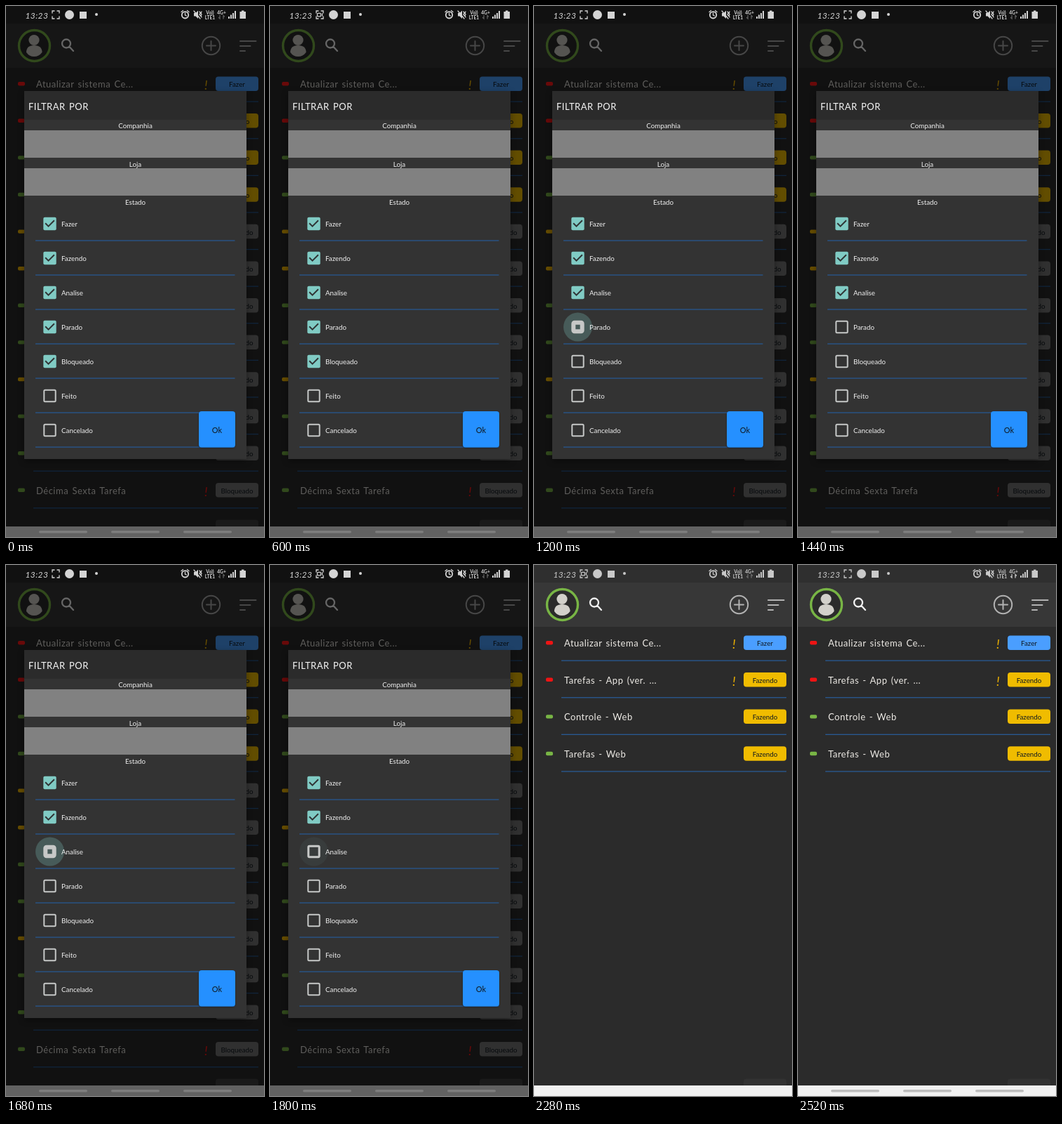
Write an HTML page that moves like this. It is 368 by 756 pixels and loops after 2.88 s.

```html
<!DOCTYPE html>
<html lang="pt">
<head>
<meta charset="utf-8">
<title>Filtrar tarefas</title>
<style>
  html, body { margin: 0; width: 100%; height: 100%; overflow: hidden; background: #2b2b2b; }
  svg {
    display: block; width: 368px; height: 756px; font: 9.8px Lato, sans-serif;
    --bar: #2f2f2f; --head: #373737; --page: #2b2b2b; --status: #c9c9c9;
    --ring: #78b545; --person: #d2d0ca; --find: #f0f0f0; --icon: #b2b2b2;
    --title: #eeebe6; --line: #285a94; --label: #101820;
    --red: #ee1414; --green: #78b545; --amber: #f0b400;
    --blue: #4a9eff; --yellow: #f0bc00; --grey: #343434; --late: #323232;
    --nav: #f1f1f1; --grip: #bdbdbd;
  }
  svg.dim {
    --bar: #111; --head: #161616; --page: #111; --status: #d4d4d4;
    --ring: #31491c; --person: #555451; --find: #666; --icon: #474747;
    --title: #5f5e5c; --line: #10243b; --label: #070a0d;
    --red: #680909; --green: #31491c; --amber: #664d00;
    --blue: #1e4168; --yellow: #624d00; --grey: #303030; --late: #1a1a1a;
    --nav: #626262; --grip: #7d7d7d;
  }
  .big { font-size: 13px; letter-spacing: .5px; word-spacing: 1.5px; }
  .mid { text-anchor: middle; }
  .clock { font-size: 12px; font-style: italic; letter-spacing: .4px; }
  .net { font-size: 6.6px; font-weight: 700; }
  .bang { font-size: 18px; font-style: italic; }
  .stroke { fill: none; stroke-linecap: round; }
  #dialog { filter: drop-shadow(0 3px 5px rgba(0, 0, 0, .35)); }
  #ok { filter: drop-shadow(0 1px 1px rgba(0, 0, 0, .4)); }
</style>
</head>
<body>
<svg id="stage" class="dim" viewBox="0 0 368 756">
  <rect width="368" height="756" fill="var(--page)"/>
  <rect y="25" width="368" height="63" fill="var(--head)"/>
  <rect width="368" height="25" fill="var(--bar)"/>

  <circle cx="40.5" cy="56.5" r="22" fill="var(--page)" stroke="var(--ring)" stroke-width="3.4"/>
  <g fill="var(--person)">
    <circle cx="40" cy="48.5" r="7.6"/>
    <path d="M29 66Q29 56 40 56Q51.500 56 51.500 66Q47 72 40 72Q33 72 29 66Z"/>
  </g>
  <path class="stroke" stroke="var(--find)" stroke-width="2.3" d="M92 53.500a6 6 0 1 0-12 0a6 6 0 1 0 12 0M90.500 58L96 64"/>
  <g class="stroke" stroke="var(--icon)" stroke-width="2">
    <circle cx="292.500" cy="56.500" r="12.700"/>
    <path d="M286 56.500h13M292.500 50v13M334 50h22.500M334 57h14.500M334 64h7"/>
  </g>

  <g id="list"></g>

  <g fill="var(--status)">
    <text class="clock" x="27.500" y="17.500">13:23</text>
    <circle cx="90.500" cy="12.500" r="6.500"/>
    <rect x="105" y="8" width="10" height="10"/>
    <circle cx="129" cy="12" r="2"/>
    <text class="net mid" x="291" y="11.500">Vo))</text>
    <text class="net mid" x="291" y="18.500">LTE1</text>
    <text class="net mid" x="307.500" y="11.500">4G+</text>
    <path d="M317 15h2v3h-2zM320 12.500h2v5.500h-2zM323 10h2v8h-2zM326 7h2v11h-2z"/>
    <path d="M333.500 8h2.500v-1.500h3.500v1.500h2.500v10h-8.500z"/>
    <path d="M268 10h2.500l3.500-3.500v11.500l-3.500-3.500h-2.500z"/>
  </g>
  <g class="stroke" stroke="var(--status)" stroke-width="1.300">
    <path d="M66 10v-3h3M73 7h3v3M76 15v3h-3M69 18h-3v-3"/>
    <g id="camera"><rect x="67.500" y="10.300" width="5" height="4.600" rx="1"/><path d="M74.500 11v3"/></g>
    <path id="arrows" d="M305 13.500v4.500l-1.500-1.500M310 18v-4.500l1.500 1.500"/>
    <circle cx="255.500" cy="12.800" r="4.700" stroke-width="1.800"/>
    <path d="M255.500 10v3l2 1M250 8.500l2.500-2M261 8.500l-2.500-2M268 7l9 11M276 8l1.500 2-1.500 2 1.500 2M279 8l-1 2 1 2-1 2 1 2"/>
  </g>

  <rect y="741" width="368" height="15" fill="var(--nav)"/>
  <g id="grips" fill="var(--grip)">
    <rect x="47" y="747" width="69" height="3.600" rx="1.800"/>
    <rect x="150" y="747" width="69" height="3.600" rx="1.800"/>
    <rect x="253" y="747" width="69" height="3.600" rx="1.800"/>
  </g>

  <g id="dialog">
    <rect x="26" y="121" width="317" height="524" fill="#333"/>
    <rect x="26" y="121" width="317" height="41" fill="#2b2b2b"/>
    <path d="M26 177h317v39H26zM26 231h317v39H26z" fill="#818181"/>
    <text class="big" x="32" y="148" fill="#f5f5f5">FILTRAR POR</text>
    <g class="mid" fill="#f0f0f0">
      <text x="184.500" y="174">Companhia</text>
      <text x="184.500" y="228.500">Loja</text>
      <text x="184.500" y="282.500">Estado</text>
    </g>
    <g id="states"></g>
    <rect id="ok" x="275" y="577" width="52" height="51.500" rx="4" fill="#2590ff"/>
    <text class="mid" x="301" y="607.500" font-size="11" fill="#101820">Ok</text>
  </g>
</svg>
<script>
const LOOP = 2880, STEP = 120, CLOSE = 19;
const $ = id => document.getElementById(id);

function set(el, attrs) {
  for (const key in attrs) el.setAttribute(key, attrs[key]);
  return el;
}
function add(parent, tag, attrs, text = '') {
  const el = set(document.createElementNS('http://www.w3.org/2000/svg', tag), attrs);
  el.textContent = text;
  return parent.appendChild(el);
}
const show = (el, on) => el.setAttribute('display', on ? 'inline' : 'none');

// mark colour, title, badge, badge colour, priority colour
const tasks = [
  ['red', 'Atualizar sistema Ce...', 'Fazer', 'blue', 'amber'],
  ['red', 'Tarefas - App (ver. ...', 'Fazendo', 'yellow', 'amber'],
  ['green', 'Controle - Web', 'Fazendo', 'yellow'],
  ['green', 'Tarefas - Web', 'Fazendo', 'yellow'],
  ...['amber', 'amber', 'green', 'green', 'amber', 'green', 'green']
    .map(mark => [mark, '', 'Bloqueado', 'grey']),
  ['green', 'Décima Sexta Tarefa', 'Bloqueado', 'grey', 'red'],
  ['red', 'Dual', 'Bloqueado', 'late', 'red']
];

const rows = tasks.map(([mark, title, badge, color, bang], i) => {
  const y = 110.7 + 52.6 * i;
  const tag = add($('list'), 'rect', { x: 299, y: y - 10.3, width: 61, height: 20.5, rx: 4, fill: `var(--${color})` });
  const info = add($('list'), 'g');
  add(info, 'rect', { x: 17, y: y - 2.7, width: 10, height: 5.4, rx: 2, fill: `var(--${mark})` });
  add(info, 'text', { class: 'big', x: 43, y: y + 5.5, fill: 'var(--title)' }, title);
  if (bang) add(info, 'text', { class: 'bang', x: 283, y: y + 8.5, fill: `var(--${bang})` }, '!');
  add(info, 'text', { class: 'mid', x: 329.5, y: y + 4.5, fill: 'var(--label)' }, badge);
  add(info, 'rect', { x: 39, y: y + 24.8, width: 321, height: 1.3, fill: 'var(--line)' });
  return { info, tag };
});

// label, step of the tap that clears it (-9: clear from the start)
const options = [
  ['Fazer', 99], ['Fazendo', 99], ['Analise', 13], ['Parado', 9],
  ['Bloqueado', 6], ['Feito', -9], ['Cancelado', -9]
];

const boxes = options.map(([label, tap], i) => {
  const y = 310 + 49 * i, g = $('states');
  const ripple = add(g, 'circle', { cx: 62.5, cy: y, fill: '#80cbc4' });
  const on = add(g, 'g');
  add(on, 'rect', { x: 53.3, y: y - 9.2, width: 18.4, height: 18.4, rx: 2, fill: '#80cbc4' });
  add(on, 'path', { d: `M56.100 ${y - .7}l4.400 4.400 8.400-8.400`, fill: 'none', stroke: '#303536', 'stroke-width': 2 });
  const off = add(g, 'rect', { rx: 1.5, fill: 'none', stroke: '#c6c8c7' });
  add(g, 'text', { x: 79, y: y + 4.3, fill: '#f0f0f0' }, label);
  add(g, 'rect', { x: 42, y: y + 23, width: 284.5, height: 2, fill: '#2b4a6f' });
  return { y, tap, ripple, on, off };
});

// ripple radius, ripple opacity, outline width
const phases = [[13, .12, 2], [20.5, .26, 6], [20.5, .06, 3], [0, 0, 2]];

function drawBox({ y, tap, ripple, on, off }, step) {
  const age = step - tap;
  const [r, opacity, edge] = phases[age < 0 ? 3 : Math.min(age, 3)];
  const size = 18.4 - edge;
  set(ripple, { r, opacity });
  set(off, { x: 62.5 - size / 2, y: y - size / 2, width: size, height: size, 'stroke-width': edge });
  show(on, age < 1);
  show(off, age >= 1);
}

function draw(step) {
  const open = step < CLOSE;
  $('stage').classList.toggle('dim', open);
  show($('dialog'), open);
  rows.forEach(({ info, tag }, i) => {
    const last = i === 12;
    show(info, i < 4 || open && (!last || step >= 18));
    show(tag, i < 4 || open || last);
  });
  boxes.forEach(box => drawBox(box, step));
  show($('camera'), Math.floor(step / 5) % 2);
  $('arrows').setAttribute('opacity', step <= CLOSE ? .4 : 1);
  show($('grips'), step !== CLOSE);
}

let shown = -1;
function tick() {
  const step = Math.floor(performance.now() % LOOP / STEP);
  if (step !== shown) draw(shown = step);
  requestAnimationFrame(tick);
}
tick();
</script>
</body>
</html>
```
